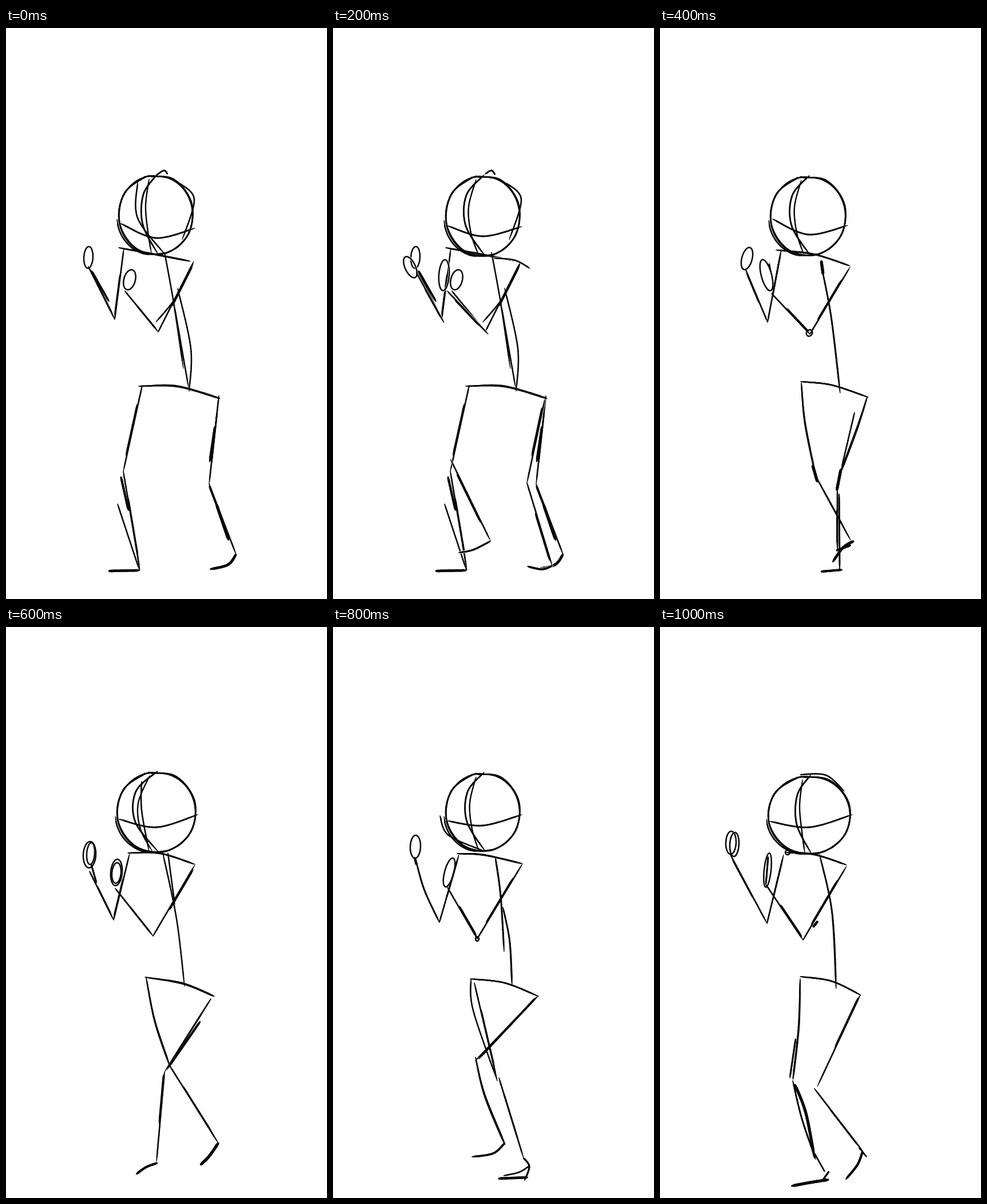
Recreate the animation shown at these times as an HTML page with a canvas. Size 561 by 998 pixels, loop 1200 ms.

```html
<!DOCTYPE html>
<html lang="en">
<head>
<meta charset="utf-8">
<title>Walk cycle sketch</title>
<style>
html, body { margin: 0; width: 100%; height: 100%; overflow: hidden; background: #fff; }
canvas { display: block; width: 561px; height: 998px; }
</style>
</head>
<body>
<canvas id="stage" width="561" height="998"></canvas>
<script>
const ctx = document.getElementById('stage').getContext('2d');
const HOLD = 200;
const INK = '#080808';
let seed = 1, grow = 0;

// Seeded value between -k and k.
function wobble(k) {
  seed = (seed * 16807) % 2147483647;
  return (seed / 2147483647 * 2 - 1) * k;
}

function pairs(n) {
  const points = [];
  for (let i = 0; i < n.length; i += 2) points.push([n[i], n[i + 1]]);
  return points;
}

function spline(p, t) {
  const n = p.length - 1, i = Math.min(n - 1, Math.floor(t * n)), u = t * n - i;
  const at = k => p[Math.max(0, Math.min(n, k))];
  const [a, b, c, d] = [at(i - 1), at(i), at(i + 1), at(i + 2)];
  return [0, 1].map(k => b[k] + u / 2 * (c[k] - a[k] +
    u * (2 * a[k] - 5 * b[k] + 4 * c[k] - d[k] + u * (3 * (b[k] - c[k]) + d[k] - a[k]))));
}

// A pen line that thins towards both ends.
function pen(points, width) {
  const steps = 12 * points.length;
  let from = points[0];
  for (let i = 1; i <= steps; i++) {
    const t = i / steps, to = spline(points, t);
    ctx.lineWidth = width * Math.min(1, 0.45 + 5 * Math.min(t, 1 - t)) + grow;
    ctx.beginPath();
    ctx.moveTo(...from);
    ctx.lineTo(...to);
    ctx.stroke();
    from = to;
  }
}

const line = (width, ...n) => pen(pairs(n), width);

// A curve gone over a second time, slightly beside the first.
function bow(...n) {
  const points = pairs(n);
  pen(points, 2.6);
  const dx = wobble(1.5), dy = wobble(1.5);
  pen(points.map(([x, y], i) => i ? [x + dx, y + dy] : spline(points, 0.12)), 2.4);
}

// Straight bones, each with a shorter stroke laid over it.
function limb(...n) {
  const points = pairs(n);
  for (let i = 1; i < points.length; i++) {
    const bone = [points[i - 1], points[i]];
    pen(bone, 2.6);
    const t = 0.2 + wobble(0.2), dx = wobble(2);
    pen([t, t + 0.5].map(u => {
      const [x, y] = spline(bone, u);
      return [x + dx, y];
    }), 2.8);
  }
}

function ring(x, y, rx, ry, turn = 0) {
  ctx.lineWidth = 2.5 + grow;
  ctx.beginPath();
  ctx.ellipse(x, y, rx, ry, turn * Math.PI / 180, 0, 7);
  ctx.stroke();
}

function arc(x, y, rx, ry, from, sweep, width) {
  const points = [];
  for (let i = 0; i <= 8; i++) {
    const a = (from + sweep * i / 8) * Math.PI * 2;
    points.push([x + rx * Math.cos(a), y + ry * Math.sin(a)]);
  }
  pen(points, width);
}

// Ball with a face line bulging to "side" and an eye line through three heights.
function head(x, y, rx, ry, side, left, middle, right) {
  arc(x, y, rx, ry, 0.7, 1.02, 2.8);
  arc(x + wobble(2), y + 1, rx - 2, ry - 1, 0.2, 0.6, 2.5);
  arc(x - 4, y + 4, rx - 1, ry - 3, 0.27, 0.22, 2.3);
  arc(x + 3, y + 1, rx - 4, ry - 2, 0.72, 0.5, 2.3);
  line(2.8, x + 2, y - ry, side + 4, y - ry / 2, side + 3, y + ry / 4, x + 4, y + ry);
  line(2.3, x - 12, y - ry + 8, side + 8, y - 15, side + 12, y + 30, x - 8, y + ry - 3);
  line(2.8, x - rx + 4, left, x, middle, x + rx + 3, right);
}

function contactBody() {
  bow(197, 384, 250, 394, 322, 408);
  line(2.5, 277, 392, 293, 480, 310, 595);
  line(2.5, 300, 455, 323, 560, 320, 635);
  line(2.5, 295, 490, 319, 628);
  bow(232, 626, 300, 627, 374, 648);
  ring(216, 440, 10, 18, 15);
  ring(144, 401, 8, 19, 3);
  limb(144, 417, 190, 509, 206, 385);
  limb(208, 460, 266, 531, 328, 408);
  line(2.5, 327, 412, 297, 471, 262, 514);
  line(3.5, 150, 425, 180, 478);
  limb(238, 625, 205, 775, 234, 947);
  line(4, 201, 785, 214, 843);
  line(2.5, 195, 832, 233, 947);
  line(4.5, 180, 949, 233, 948);
  limb(372, 643, 355, 797, 402, 920);
  line(4, 365, 697, 356, 758);
  line(5, 368, 833, 389, 895);
  line(4.5, 402, 920, 388, 938, 357, 946);
}

function contact() {
  head(262, 326, 65, 70, 236, 342, 367, 350);
  line(2.5, 282, 255, 276, 249, 262, 258);
  line(2.5, 230, 270, 230, 332, 278, 396);
  line(2.5, 303, 271, 329, 300, 308, 370);
  contactBody();
}

function recoilExtra() {
  ring(135, 418, 9, 20, -25);
  ring(194, 432, 9, 27, 4);
  limb(146, 428, 194, 515);
  limb(200, 460, 271, 535);
  line(2.5, 281, 402, 318, 406, 344, 420);
  limb(206, 755, 275, 896);
  line(3, 275, 897, 245, 912, 220, 917);
  limb(370, 650, 339, 795, 383, 940);
  line(3.5, 383, 940, 365, 946, 340, 941);
}

function recoil() {
  head(262, 328, 65, 71, 229, 346, 364, 347);
  line(2.5, 283, 256, 277, 249, 266, 255);
  line(2.5, 303, 271, 329, 300, 308, 370);
  contactBody();
  // A white edge separates the new strokes from the old ones.
  grow = 1.5;
  ctx.strokeStyle = '#fff';
  const before = seed;
  recoilExtra();
  seed = before;
  grow = 0;
  ctx.strokeStyle = INK;
  recoilExtra();
}

function passing() {
  head(259, 328, 66, 70, 227, 334, 361, 345);
  bow(203, 388, 270, 396, 332, 416);
  bow(283, 420, 300, 510, 315, 638);
  line(5, 282, 408, 285, 430);
  bow(246, 618, 300, 624, 363, 645);
  ring(186, 432, 9, 28, -15);
  ring(152, 403, 9, 20, 15);
  ring(261, 533, 5, 6, 30);
  line(2, 191, 412, 194, 428);
  limb(150, 423, 188, 514, 212, 387);
  limb(195, 464, 262, 535, 332, 418);
  bow(247, 620, 253, 690, 270, 775);
  line(5, 267, 765, 275, 793);
  limb(273, 785, 333, 895);
  line(4.5, 338, 897, 320, 908, 302, 933);
  line(4, 309, 913, 333, 904);
  bow(362, 645, 345, 700, 317, 775);
  line(2.5, 340, 672, 317, 770);
  line(5, 316, 772, 309, 808);
  limb(310, 808, 310, 912);
  line(3, 313, 815, 314, 947);
  line(4, 282, 950, 318, 947);
}

function crossing() {
  head(263, 323, 69, 71, 223, 336, 350, 328);
  line(2.5, 237, 270, 237, 320, 250, 392);
  bow(213, 395, 270, 396, 330, 415);
  line(2.5, 274, 395, 298, 510, 312, 628);
  line(2.5, 283, 395, 295, 485);
  bow(243, 612, 310, 624, 364, 646);
  ring(193, 429, 10, 23, 5);
  ring(193, 430, 8, 18, 5);
  ring(146, 398, 11, 23, 3);
  ring(148, 396, 7, 19, 4);
  limb(146, 427, 188, 512, 216, 396);
  line(3, 149, 415, 158, 447);
  limb(191, 457, 257, 540, 330, 416);
  bow(245, 613, 260, 690, 285, 765);
  limb(285, 765, 371, 902);
  line(5, 371, 902, 355, 925, 340, 940);
  limb(358, 650, 277, 778, 263, 935);
  line(4, 339, 690, 282, 772);
  line(4, 264, 937, 245, 944, 228, 956);
}

function lift() {
  head(262, 323, 65, 69, 231, 339, 347, 328);
  line(2.5, 187, 330, 202, 364, 265, 392);
  bow(217, 396, 265, 399, 331, 414);
  line(3, 284, 404, 293, 470, 299, 567);
  bow(297, 490, 309, 550, 313, 625);
  bow(240, 615, 300, 622, 358, 645);
  ring(203, 429, 8, 26, 15);
  ring(144, 384, 9, 20, 2);
  ring(252, 545, 3, 4);
  line(4, 143, 404, 146, 415);
  bow(144, 405, 160, 460, 186, 516);
  limb(186, 516, 220, 398);
  limb(200, 455, 252, 545, 331, 414);
  line(2.5, 241, 616, 245, 670, 287, 793);
  limb(247, 622, 287, 793);
  limb(290, 788, 333, 928);
  line(3, 333, 928, 343, 943, 335, 967);
  line(2.5, 343, 942, 325, 953, 298, 959);
  line(4.5, 290, 964, 340, 962);
  limb(358, 645, 255, 755);
  line(3, 353, 650, 249, 758);
  bow(249, 752, 265, 820, 300, 905);
  line(3.5, 300, 902, 280, 920, 243, 926);
}

function reach() {
  head(261, 328, 72, 69, 236, 340, 350, 328);
  line(2.5, 245, 258, 290, 259, 322, 287);
  bow(220, 394, 270, 398, 326, 416);
  ring(223, 394, 4, 4);
  bow(279, 398, 301, 500, 308, 632);
  bow(245, 611, 300, 619, 350, 643);
  ring(188, 425, 6, 30, 6);
  line(3, 189, 402, 185, 450);
  ring(124, 377, 9, 20, 2);
  ring(130, 380, 8, 21, 3);
  limb(123, 398, 187, 518, 216, 398);
  limb(185, 450, 250, 547, 326, 418);
  line(4, 275, 515, 268, 524);
  bow(245, 615, 242, 700, 232, 790);
  line(3, 237, 720, 227, 788);
  bow(232, 793, 248, 860, 272, 930);
  line(5, 236, 800, 255, 850, 270, 928);
  line(2.5, 270, 920, 288, 952);
  line(3, 295, 952, 285, 966);
  line(5, 294, 966, 262, 971, 230, 977);
  limb(350, 643, 275, 803);
  limb(270, 807, 355, 917);
  line(2.5, 348, 910, 361, 926);
  line(4, 354, 917, 345, 940, 325, 965);
}

const poses = [contact, recoil, passing, crossing, lift, reach];
const start = performance.now();
let shown = -1;

function loop() {
  const pose = Math.floor((performance.now() - start) / HOLD) % poses.length;
  if (pose !== shown) {
    shown = pose;
    seed = 77;
    ctx.fillStyle = '#fff';
    ctx.fillRect(0, 0, 561, 998);
    ctx.lineCap = 'round';
    ctx.strokeStyle = INK;
    poses[pose]();
  }
  requestAnimationFrame(loop);
}
loop();
</script>
</body>
</html>
```
